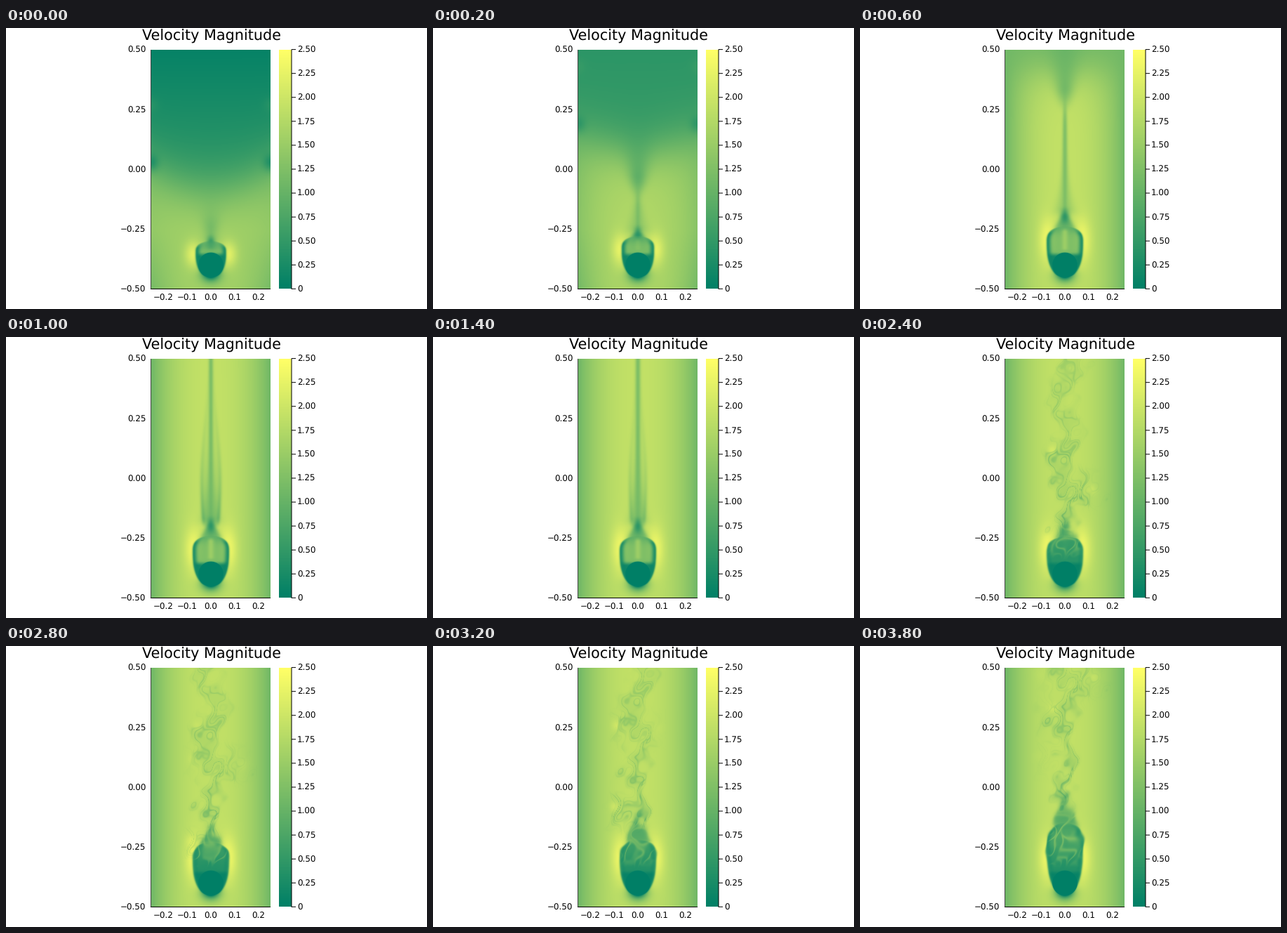
Animation of 600x400 px, one loop 4 s. Source, as a matplotlib script:

```python
import numpy as np
import matplotlib.pyplot as plt
from matplotlib.animation import FuncAnimation

DPI = 100
W, H = 600, 400
LEFT, RIGHT, TOP, BOTTOM = 207, 377, 31, 372
MID = 292
FRAMES = 20
RISE = 24                               # wake drift in pixels per step

# Pixel grid of the heat map; x is measured from the centre line.
X, Y = np.meshgrid(np.arange(LEFT, RIGHT) + 0.5 - MID, np.arange(TOP, BOTTOM) + 0.5)
U = np.abs(X) / 85                      # 0 at the centre, 1 at the walls
YD = 0.5 - (Y - TOP) / (BOTTOM - TOP)   # data coordinate
BODY_Y, BODY_R = 337.4, 17.8
R = np.hypot(X, Y - BODY_Y)

rng = np.random.default_rng(11)


def smooth(s):
    s = np.clip(s, 0, 1)
    return s * s * (3 - 2 * s)


def sigmoid(s):
    return 1 / (1 + np.exp(-np.clip(s, -40, 40)))


def bell(d, w):
    return np.exp(-(d / w)**2)


def mix(v, value, a):
    return v + (value - v) * np.clip(a, 0, 1)


def noise(count, short, long):
    """Return a smooth random field f(x, y) of roughly unit size."""
    k = 2 * np.pi / rng.uniform(short, long, count)
    ang, phase = rng.uniform(0, 2 * np.pi, (2, count))

    def field(x, y):
        total = sum(np.sin(a * (x * np.cos(b) + y * np.sin(b)) + c)
                    for a, b, c in zip(k, ang, phase))
        return total / np.sqrt(count / 2)
    return field


bend_x, bend_y = noise(6, 20, 60), noise(6, 20, 60)
threads, curls = noise(7, 11, 26), noise(6, 18, 34)

# Shed eddies: step, x, y, radius.
EDDIES = [(12, 26, 220, 14), (12, -12, 165, 8), (16, -22, 232, 13),
          (16, -20, 116, 11), (19, -10, 92, 18), (19, 28, 48, 17)]


def stream(n):
    """Channel flow with the starting front running upward."""
    grown = min(n / 3, 1)
    steady = 1.08 + 0.82 * (1 - U**2.4)
    young = 1.65 - U**2 * (0.2 + 0.3 * np.clip((-0.25 - YD) / 0.25, 0, 1))
    behind = mix(young, steady, grown)
    ahead = min(0.06 + 0.37 * n, 1.1) + 0.75 * np.exp(-n) * (0.5 - YD)
    front = -0.1 + 0.17 * n + 0.1 * U**2 * (1 - grown)
    v = mix(ahead, behind, sigmoid((front - YD) / (0.065 - 0.015 * grown)))
    wall = bell(1 - U, 0.12) * (1 - grown)
    v *= 1 - 0.6 * wall * bell(YD - 0.03 - 0.16 * n, 0.035)
    v += 0.12 * wall * bell(YD - 0.27 - 0.16 * n, 0.03)

    centre = 322 - 20 * grown
    v += (0.6 - 0.1 * grown) * bell(np.abs(X) - 25, 12) * bell(Y - centre, 18 + 12 * grown)
    below = np.clip((Y - BODY_Y) / R, 0, 1)**2
    return v * (1 - np.exp(-np.maximum(R - BODY_R, 0) / 6.5) * below)


def wander(n):
    """Centre line of the unsteady plume."""
    swing = 4 + 0.04 * np.clip(235 - Y, 0, 200)
    return swing * np.cos(2 * np.pi * (Y - 234 + RISE * (n - 12)) / 95)


def starting_tail(v, n, apex, fade):
    """Symmetric wake: a wedge pushed upward, a thin line and two strands."""
    up = apex - Y
    above = smooth((up + 8) / 16)
    tip = 300 - 62 * n
    ahead = np.clip(tip - Y, 0, None)
    wedge = 0.8 * bell(X, 8 + 0.2 * ahead) * np.exp(-ahead / (20 + 60 * n))
    v = mix(v, min(0.25 + 0.21 * n, 1.0), wedge * smooth((tip - Y + 10) / 40))

    behind = sigmoid((Y - tip) / 10) * above * fade
    v = mix(v, 1.0, 0.5 * behind * bell(X, 3 + 12 * np.exp(-np.clip(up, 0, 400) / 35)))
    v = mix(v, 0.95, 0.4 * behind * bell(X, 3 + 0.4 * max(n - 5, 0)))

    split = smooth((n - 3) / 2) * np.exp(-max(n - 5, 0) / 5) * fade
    reach = above * np.exp(-np.clip(up, 0, 400) / 75)
    gap = (13 - 0.9 * max(n - 5, 0)) * bell(Y - 205, 120)
    v = mix(v, 0.95, 0.6 * split * reach * sigmoid((gap - np.abs(X)) / 1.5))
    return mix(v, 0.7, 0.55 * split * reach * bell(np.abs(X) - gap, 3))


def unsteady_tail(v, n, apex, late):
    """Wandering plume of threads with eddies carried along."""
    drift = Y + RISE * n
    x = X + 6 * bend_x(X, drift)
    y = Y + 6 * bend_y(X, drift)
    thread = bell(threads(x * 1.1, (drift + y - Y) * 0.45), 0.6)
    height = np.clip(apex + 20 - Y, 0, 400)

    width = 9 + 0.02 * height
    plume = bell(x - wander(n), width) * smooth((apex + 25 - Y) / 30)
    depth = 0.32 + 0.4 * np.exp(-height / 60)
    v = mix(v, 1.0 - 0.3 * np.exp(-height / 50), late * plume * depth * (0.5 + 0.8 * thread))

    for born, ex, ey, r in EDDIES:
        age = n - born
        life = smooth(1 - abs(age) / 4)
        if life == 0:
            continue
        cx, cy = ex * (1 + 0.08 * age), ey - RISE * age
        d = np.hypot(x - cx, (y - cy) * 0.75)
        strength = 0.35 + 0.3 * smooth((ey - 100) / 120)
        v = mix(v, 0.95, life * strength * bell(d, r) * (0.3 + 0.9 * thread))
        v += 0.2 * life * bell(np.hypot(X - cx * 1.5, Y - cy + 3), 7)
    return v


def bubble(v, n, top, apex, late):
    """Slow egg-shaped pocket above the body with a dark skin."""
    wide = 20 + 4.3 * min(n / 3, 1)
    x = X + 1.8 * late * bend_x(X, Y + 8 * n) * smooth((310 - Y) / 30)

    # Roof cone from the apex down to the shoulders.
    s = np.clip((Y - apex) / (top + 10 - apex), 0, 1)
    cone = sigmoid((3 + 15 * s - np.abs(x)) / 2) * smooth((Y - apex + 12) / 14)
    cone = cone * sigmoid((top + 8 - Y) / 3)
    grain = curls(x + 5 * bend_x(x, Y), Y * 0.7 + 9 * n)
    light = late * bell(grain, 0.55)
    v = mix(v, 0.45 + 0.35 * light, (0.65 + 0.1 * late) * cone)
    v = mix(v, 0.1, 0.6 * (1 - late) * bell(X, 6) * bell(Y - apex - 5, 9))

    t = (Y - top) / (355.5 - top)
    q = np.where(t > 0.3, (t - 0.3) / 0.7, (0.3 - t) / 0.3)
    half = wide * np.sqrt(np.clip(1 - np.clip(q, 0, 1)**2.5, 0, 1))
    edge = np.abs(x) - half
    gate = smooth((Y - top + 3) / 8) * smooth((356 - Y) / 6)
    inside = sigmoid(-edge / 0.9) * gate

    tall = smooth((322 - Y) / 60)
    pocket = mix(0.85, 0.15 + 0.5 * tall + 0.5 * light * smooth((318 - Y) / 20), late)
    v = mix(v, pocket, inside * (0.65 + 0.25 * late))
    streak = (1 - late) * min(n / 3, 1)
    v = mix(v, 1.6, 0.8 * streak * bell(X, 4.5)
            * smooth((Y - top - 1) / 8) * smooth((320 - Y) / 6))
    v = mix(v, 1.2, 0.45 * (1 - late) * inside * bell(Y - 317 - 0.008 * X**2, 2.5))

    skin = bell(edge, np.where(edge > 0, 2.2, 4.5)) * gate
    v = mix(v, 0.12, (0.85 - 0.15 * late) * skin * smooth((Y - top) / 12))
    return mix(v, 0.05, 0.9 * inside * smooth((Y - 318) / 8))


def speed(n):
    late = smooth((n - 8.5) / 4)
    top = np.interp(n, [0, 3, 12, 16, 19], [303, 282, 284, 276, 252])
    apex = top - 18 * min(n / 3, 1) - 20 * smooth((n - 13) / 5)
    v = stream(n)
    if late < 1:
        v = starting_tail(v, n, apex, 1 - late)
    if late > 0:
        v = unsteady_tail(v, n, apex, late)
    v = bubble(v, n, top, apex, late)
    return np.clip(v * sigmoid((R - BODY_R) * 4), 0, 2.5)


plt.rcParams["text.hinting"] = "none"
fig = plt.figure(figsize=(W / DPI, H / DPI), dpi=DPI, facecolor="white")
ax = fig.add_axes([0, 0, 1, 1])
ax.axis("off")
shade = dict(cmap="summer", vmin=0, vmax=2.5, aspect="auto")
heat = ax.imshow(speed(0), extent=(LEFT, RIGHT, BOTTOM, TOP), interpolation="nearest", **shade)
ax.imshow(np.linspace(2.5, 0, 340)[:, None], extent=(389, 407, 371, 31), **shade)
ax.set_xlim(0, W)
ax.set_ylim(H, 0)


def label(x, y, s, ha="center", size=11.9):
    ax.text(x, y, s.replace("-", "\u2212"), ha=ha, va="baseline",
            fontsize=size * 72 / DPI, family="DejaVu Sans", color="black")


def line(xs, ys, color="black"):
    ax.plot(xs, ys, color=color, lw=72 / DPI, solid_capstyle="butt", snap=False)


label(292.5, 18, "Velocity Magnitude", size=20.75)
for i in range(5):
    label(224 + 34 * i, 387.5, f"{(i - 2) / 10:.1f}")
    label(199.4, 35.3 + 85.2 * i, f"{0.5 - 0.25 * i:.2f}", "right")
for i in range(11):
    y = 371.3 - 34.07 * i
    line([407, 413], [y, y])
    label(415, y + 4.3, f"{i / 4:.2f}" if i else "0", "left")
line([407, 407], [30.5, 371.8])
line([206.5, 206.5], [31, 372], "#444444")
line([206, 377], [371.5, 371.5])


def draw(n):
    heat.set_data(speed(n))
    return (heat,)


anim = FuncAnimation(fig, draw, frames=FRAMES, interval=200, repeat=True, repeat_delay=0)
plt.show()
```
